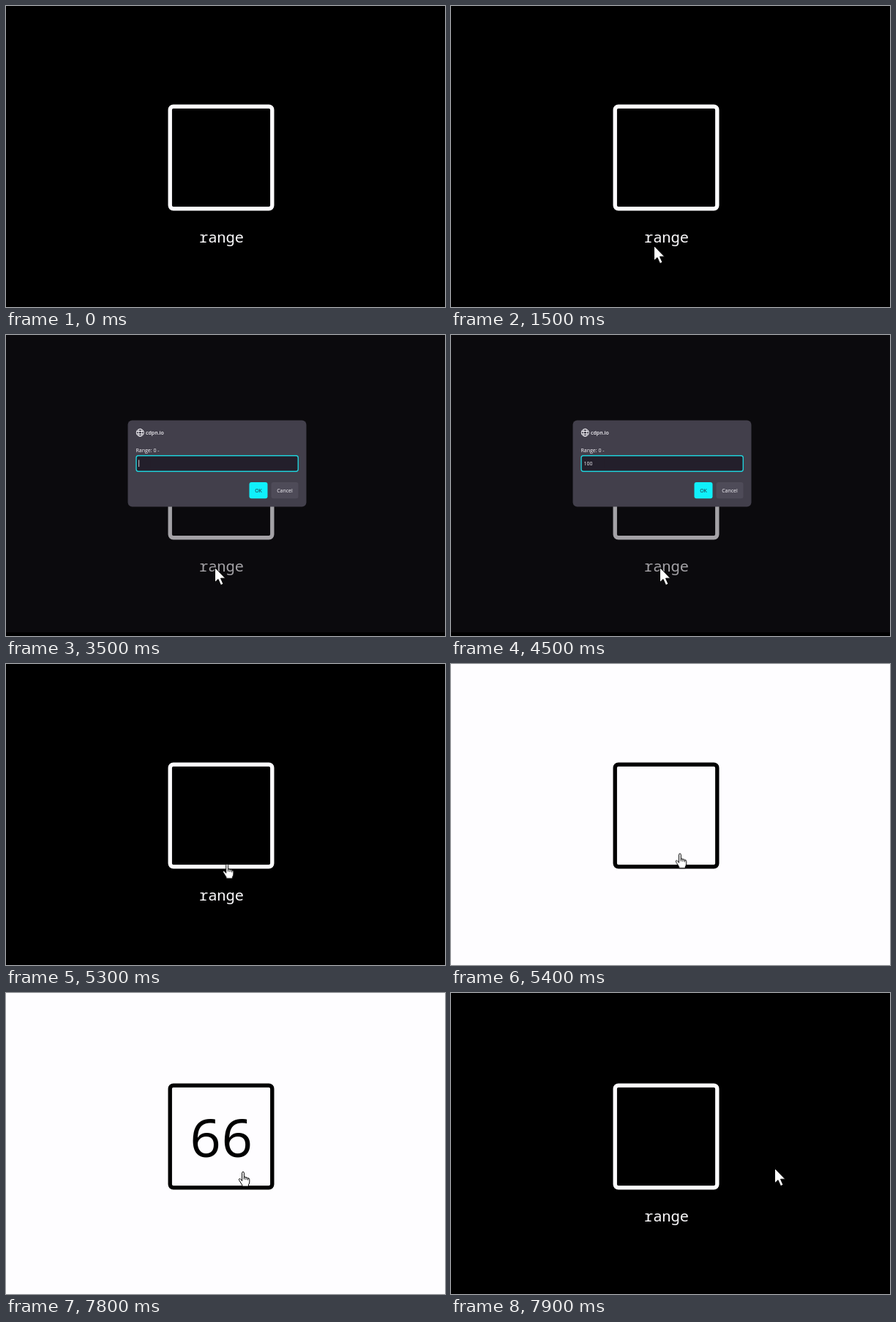
Animation, 600 px wide and 411 px high, one loop 8 s. Source, as an HTML page:

```html
<!DOCTYPE html>
<html lang="en">
<head>
<meta charset="utf-8">
<title>Random number range</title>
<style>
  :root { --white: #fefdff; --loop: 8s step-end infinite; }
  html, body { margin: 0; width: 100%; height: 100%; overflow: hidden; background: #000; }
  svg { display: block; width: 100%; height: 100%; }
  text { white-space: pre; }

  .flash { fill: var(--white); animation: flash var(--loop); }
  .page { animation: scroll 8s linear infinite; }
  .box { fill: none; stroke-width: 5.4; animation: box var(--loop); }
  .label, .number { font-family: "Noto Sans Mono", monospace; text-anchor: middle; }
  .label { font-size: 20.4px; fill: var(--white); }
  .number { font-size: 72px; fill: #000; }
  .first { animation: first var(--loop); }
  .second { animation: second var(--loop); }

  .prompt { font: 7px "Open Sans", "Noto Sans", sans-serif; fill: #f7f5fa; animation: prompt var(--loop); }
  .mid { text-anchor: middle; }
  .typing { animation: typing var(--loop); }
  .caret { fill: #f2f0f5; animation: caret var(--loop); }

  .cursor { fill: #fff; stroke: #000; stroke-linejoin: round; animation: move 8s linear infinite; }
  .arrow { animation: arrow var(--loop); }
  .hand { animation: hand var(--loop); }

  @keyframes flash {
    0%, 98.75%, 100% { opacity: 0; }
    67.5% { opacity: 1; }
  }
  @keyframes box {
    0%, 98.75%, 100% { stroke: var(--white); }
    67.5% { stroke: #000; }
  }
  @keyframes first {
    0%, 83.75%, 100% { opacity: 0; }
    73.75% { opacity: 1; }
  }
  @keyframes second {
    0% { opacity: 0; }
    83.75%, 100% { opacity: 1; }
  }
  @keyframes scroll {
    0% { transform: none; }
    82.5% { transform: translateY(0); animation-timing-function: ease-out; }
    93.75%, 100% { transform: translateY(-11px); }
  }
  @keyframes prompt {
    0%, 57.5%, 100% { visibility: hidden; }
    28.75% { visibility: visible; }
  }
  @keyframes typing {
    0% { transform: translateX(0); }
    46.25% { transform: translateX(4px); }
    48.75% { transform: translateX(8px); }
    51.25%, 100% { transform: translateX(12px); }
  }
  @keyframes caret {
    0%, 41.25% { opacity: 1; }
    36.25%, 56.25%, 100% { opacity: 0; }
  }
  @keyframes move {
    0% { transform: translate(620px, 213px); animation-timing-function: step-end; }
    11.25% { transform: translate(588px, 211px); animation-timing-function: cubic-bezier(.3, .2, .5, 1); }
    18.75% { transform: translate(277px, 327px); animation-timing-function: ease-in-out; }
    22.5% { transform: translate(285px, 317px); animation-timing-function: step-end; }
    66.25% { transform: translate(302px, 273px); animation-timing-function: ease-out; }
    70% { transform: translate(324px, 244px); animation-timing-function: step-end; }
    98.75%, 100% { transform: translate(442px, 239px); }
  }
  @keyframes arrow {
    0%, 28.75%, 98.75%, 100% { opacity: 1; }
    22.5%, 57.5% { opacity: 0; }
  }
  @keyframes hand {
    0%, 28.75%, 98.75%, 100% { opacity: 0; }
    22.5%, 57.5% { opacity: 1; }
  }
</style>
</head>
<body>
<svg viewBox="0 0 600 411" preserveAspectRatio="none">
  <rect width="600" height="411"/>
  <rect class="flash" width="600" height="411"/>

  <g class="page">
    <rect class="box" x="224.2" y="137.2" width="139.6" height="139.6" rx="4.5"/>
    <text class="label" x="294.5" y="322.5">range</text>
    <text class="number first" x="294.5" y="234.5">51</text>
    <text class="number second" x="294.5" y="234.5">66</text>
  </g>

  <g class="prompt">
    <rect width="600" height="406" fill="#1c1b22" fill-opacity=".4"/>
    <rect x="166.5" y="116.5" width="244" height="118" rx="6" fill="#423f4b"/>
    <g fill="none" stroke="#f7f5fa" stroke-width="1">
      <circle cx="183.3" cy="133.3" r="5"/>
      <ellipse cx="183.3" cy="133.3" rx="2.3" ry="5"/>
      <path d="M178.8 131.5h9M178.8 135.1h9"/>
    </g>
    <text x="191" y="136" font-weight="600">cdpn.io</text>
    <text x="177.5" y="159.5">Range: 0 -</text>

    <rect x="178" y="164.7" width="221.3" height="21.6" rx="3" fill="#231f2b" stroke="#21d0d9" stroke-width="1.4"/>
    <text x="181.5" y="178.3">100</text>
    <g class="typing">
      <rect x="181.4" y="169" width="16" height="13" fill="#231f2b"/>
      <rect class="caret" x="181.3" y="170.5" width=".8" height="9.5"/>
    </g>

    <rect x="332.5" y="201" width="25" height="22.3" rx="3" fill="#10f0fb"/>
    <text class="mid" x="345" y="214.6" fill="#1f2a36">OK</text>
    <rect x="362.5" y="201" width="37" height="22.3" rx="3" fill="#4e4b58"/>
    <text class="mid" x="381" y="214.6">Cancel</text>
  </g>

  <g class="cursor">
    <path class="arrow" d="M.5 .5V20.7L5 16.6 8.6 24.6 12 23.1 8.5 15.2H14.8Z"/>
    <g class="hand">
      <path d="M-1.4 12.5V1.6a1.4 1.4 0 0 1 2.8 0V7.2q2-.7 2.6.8 2-.6 2.5.8 2.3-.3 2.3 2V14q0 2-1.4 4V20H-1.2V18.2L-5.4 11.5q-.8-1.7.7-2 1.3 0 3.3 3Z"/>
      <path fill="none" d="M1.4 7V10.5M4 8V11M6.5 8.8V11.5"/>
    </g>
  </g>
</svg>
</body>
</html>
```
